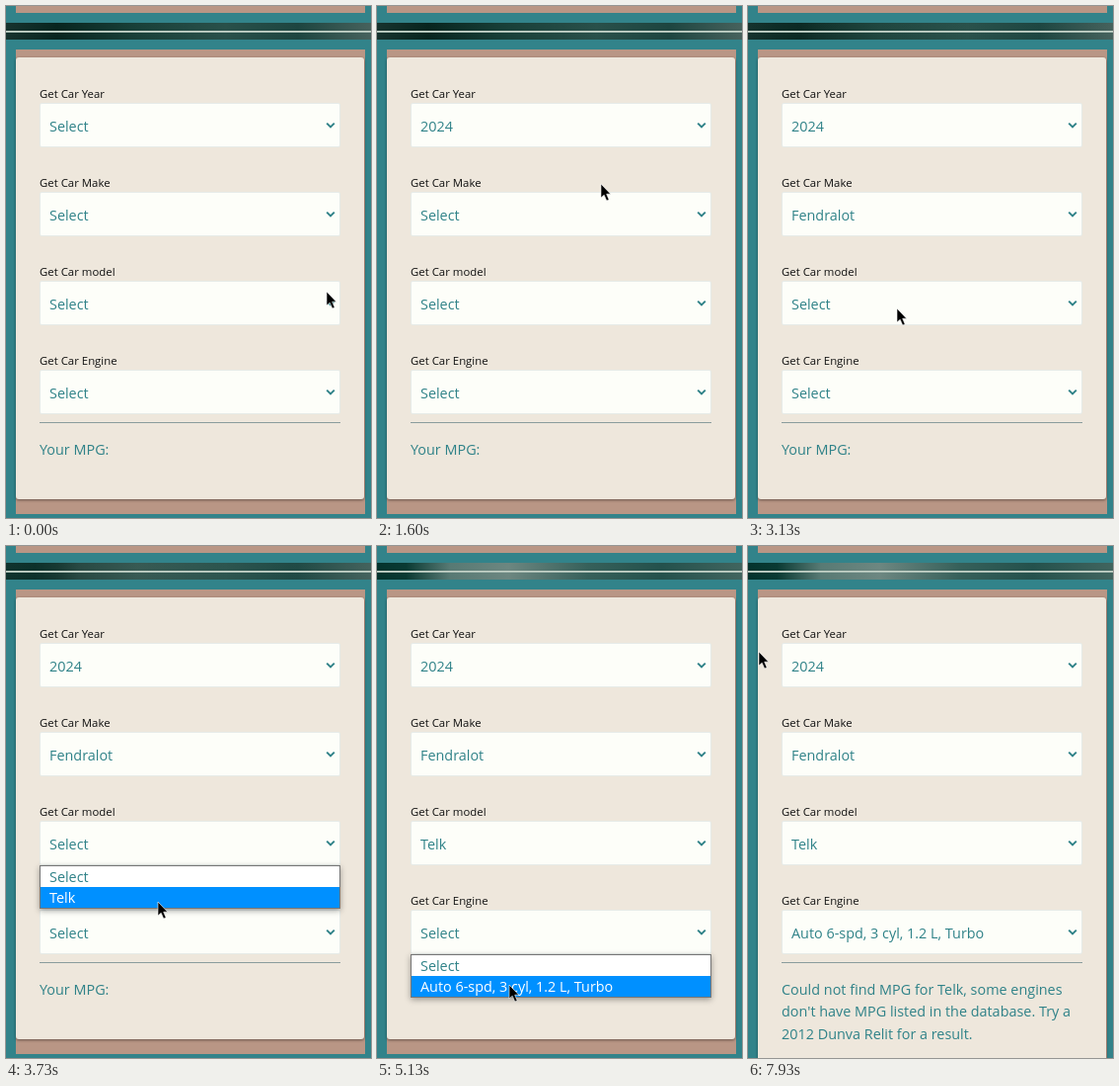
Write an HTML page that moves like this. It is 370 px wide and 518 px high and loops after 8 s.

```html
<!DOCTYPE html>
<html lang="en">
<head>
<meta charset="utf-8">
<title>Car MPG form</title>
<style>
  html, body { margin: 0; width: 100%; height: 100%; overflow: hidden; background: #32838a; }
  #stage { position: relative; width: 370px; height: 518px; overflow: hidden; background: #32838a;
    font: 14.4px "Open Sans", "Noto Sans", sans-serif; color: #2f8288; white-space: nowrap; }
  #stage div, #stage svg, #stage p { position: absolute; box-sizing: border-box; margin: 0; }
  .panel { left: 10px; width: 354px; background: #b99685; }
  .strip { left: 0; top: 17px; width: 370px; height: 17px; }
  #road { background: linear-gradient(90deg, #17332e, #08251f 14%, #183f38 35%, #29504a 60%, #1d4540 80%, #47625d); }
  #glow { background: linear-gradient(90deg, #04332d, #0a3a33 8%, #587a74 20%, #6d8781 36%, #36605a 58%, #24514c 78%, #41655f); }
  #lane { left: 0; top: 25px; width: 370px; height: 2px; background: linear-gradient(#d9e2d6, #8fa8a0); }
  #card { left: 10px; top: 52px; width: 353px; background: #eee7dc; border-radius: 3px;
    box-shadow: 0 1px 3px rgba(0,0,0,.45); }
  .label { left: 34px; font-size: 11.4px; line-height: 16px; color: #111; }
  .select { left: 34px; width: 305px; height: 45px; padding: 1px 0 0 9px; line-height: 43px;
    background: #fdfef9; border: 1px solid #e6ebe8; border-radius: 2px; }
  .select svg { left: 289px; top: 18px; }
  #rule { left: 34px; top: 421px; width: 305px; height: 1px; background: #8a9c9d; }
  #result { left: 34px; top: 438px; line-height: 22.4px; }
  .list { left: 34px; width: 305px; background: #fff; border: 1px solid #767676;
    box-shadow: 0 2px 6px rgba(0,0,0,.35); overflow: hidden; }
  #stage .row { position: static; height: 21px; line-height: 21px; padding-left: 9px; }
  .row.on { background: #0090ff; color: #fff; }
  .bar { right: 0; top: 0; width: 17px; height: 100%; background: #f1f1f1; }
  .thumb { left: 2px; top: 17px; width: 13px; height: 184px; background: #c1c1c1; }
  .up { left: 4.5px; top: 6px; border: 4px solid transparent; border-top: 0; border-bottom-color: #505050; }
  #cursor { left: 0; top: 0; overflow: visible; }
</style>
</head>
<body>
<div id="stage">
  <div class="panel" style="top:0;height:7px"></div>
  <div class="strip" id="road"></div>
  <div class="strip" id="glow"></div>
  <div id="lane"></div>
  <div class="panel" id="wrap" style="top:44px"></div>
  <div id="card"></div>
  <div id="rule"></div>
  <p id="result"></p>
</div>
<script>
const LOOP = 8000, FPS = 15, ROW = 21;
const stage = document.getElementById('stage');
const $ = id => document.getElementById(id);

const years = Array.from({ length: 41 }, (_, i) => String(2024 - i));
const makes = ['QZL', 'Bovel', 'Fendralot', 'Solvane', 'Mirvok', 'Tuo', 'Moor Tavel', 'Pavno', 'RUVI', 'Kelodo'];

// open and close: when each list appears and its pick takes effect
const fields = [
  { label: 'Get Car Year', options: years, pick: '2024', open: 530, close: 1600 },
  { label: 'Get Car Make', options: makes, pick: 'Fendralot', open: 2067, close: 2867 },
  { label: 'Get Car model', options: ['Telk'], pick: 'Telk', open: 3400, close: 3933 },
  { label: 'Get Car Engine', options: ['Auto 6-spd, 3 cyl, 1.2 L, Turbo'],
    pick: 'Auto 6-spd, 3 cyl, 1.2 L, Turbo', open: 4533, close: 5267 }
];
const RESULT_AT = 5333;
const resultText = 'Could not find MPG for Telk, some engines\n' +
  "don't have MPG listed in the database. Try a\n2012 Dunva Relit for a result.";

// cursor stops: time, x, y
const path = [
  [0, 325, 289], [400, 312, 115], [933, 312, 115], [1267, 227, 180],
  [1667, 227, 180], [2000, 170, 214], [2200, 170, 214], [2533, 109, 313],
  [2867, 109, 313], [3267, 165, 304], [3467, 165, 304], [3667, 154, 360],
  [3933, 154, 360], [4333, 150, 384], [4667, 150, 384], [4933, 134, 444],
  [5467, 134, 444], [6333, 172, 167], [6533, 153, 121], [6667, 153, 121],
  [7533, 51, 125], [7733, 8, 187], [7933, 11, 107], [LOOP, 11, 107]
];

function add(parent, cls, text = '') {
  const el = document.createElement('div');
  el.className = cls;
  el.textContent = text;
  parent.append(el);
  return el;
}

fields.forEach((f, i) => {
  const top = 98 + 90 * i;
  add(stage, 'label', f.label).style.top = top - 17 + 'px';
  const box = add(stage, 'select');
  box.style.top = top + 'px';
  f.value = document.createElement('span');
  box.append(f.value);
  box.insertAdjacentHTML('beforeend',
    '<svg width="10" height="8"><path d="M1.2 1.6 5 5.4 8.8 1.6" fill="none" stroke="#2f8288" stroke-width="2"/></svg>');
  f.top = top + 46;
});

fields.forEach(f => {
  const shown = ['Select', ...f.options].slice(0, 20);
  f.list = add(stage, 'list');
  f.list.style.top = f.top - 1 + 'px';
  f.list.style.height = shown.length * ROW + 2 + 'px';
  f.rows = shown.map(text => add(f.list, 'row', text));
  if (f.options.length > 20) {
    const bar = add(f.list, 'bar');
    add(bar, 'up');
    add(bar, 'thumb');
  }
});

stage.insertAdjacentHTML('beforeend',
  '<svg id="cursor" width="12" height="19"><path d="M0 0V14L3.2 11.2 5.8 17 8.2 16 5.7 10.2H9.8Z" ' +
  'fill="#000" stroke="#fff" stroke-width=".6"/></svg>');
$('result').style.whiteSpace = 'pre';

const clamp = v => Math.min(1, Math.max(0, v));
const ease = u => u * u * (3 - 2 * u);

function cursorAt(t) {
  const i = Math.max(1, path.findIndex(p => p[0] > t));
  const [t0, x0, y0] = path[i - 1], [t1, x1, y1] = path[i];
  const u = ease(clamp((t - t0) / (t1 - t0)));
  return [Math.round(x0 + (x1 - x0) * u), Math.round(y0 + (y1 - y0) * u)];
}

function draw(now) {
  const t = Math.floor((now % LOOP + 4) * FPS / 1000) * 1000 / FPS + 1;
  const [x, y] = cursorAt(t);
  $('cursor').style.transform = `translate(${x}px, ${y}px)`;

  for (const f of fields) {
    f.value.textContent = t >= f.close ? f.pick : 'Select';
    const open = t >= f.open && t < f.close;
    f.list.style.display = open ? 'block' : 'none';
    const hover = Math.min(f.rows.length - 1, Math.max(0, Math.floor((y - f.top) / ROW)));
    f.rows.forEach((row, i) => row.classList.toggle('on', i === hover));
  }

  const done = t >= RESULT_AT;
  $('result').textContent = done ? resultText : 'Your MPG:';
  $('card').style.height = (done ? 492 : 447) + 'px';
  $('wrap').style.height = (done ? 515 : 470) + 'px';
  $('glow').style.opacity = ease(clamp((t - 2670) / 2600));
}

function tick() {
  draw(performance.now());
  requestAnimationFrame(tick);
}
tick();
</script>
</body>
</html>
```
